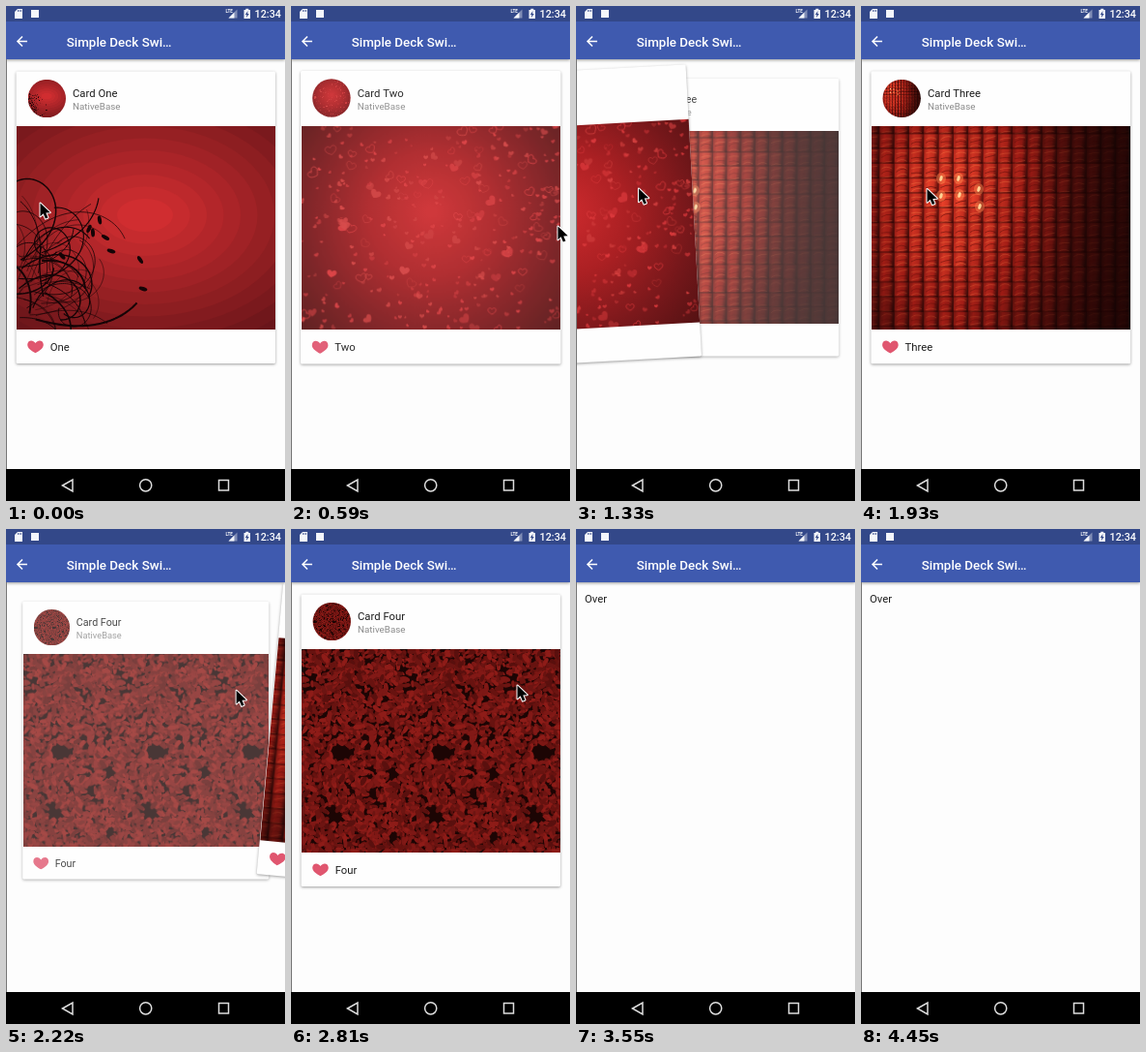
Write an HTML page with a canvas that moves like this. It is 289 by 511 pixels and loops after 4.6 s.

```html
<!DOCTYPE html>
<html lang="en">
<head>
<meta charset="utf-8">
<title>Deck swiper</title>
<style>
  html, body { margin: 0; width: 100%; height: 100%; overflow: hidden; background: #fdfdfd; }
  canvas { display: block; width: 289px; height: 511px; }
</style>
</head>
<body>
<canvas id="stage"></canvas>
<script>
const W = 289, H = 511, LOOP = 4600, TICK = 148;
const PAGE = '#fdfdfd';
const IMG = { x: 11, y: 124, w: 268, h: 210 };
const CENTER = { x: 144.75, y: 218.5 };
const TAU = Math.PI * 2;
const dpr = window.devicePixelRatio || 1;

const canvas = document.getElementById('stage');
canvas.width = W * dpr;
canvas.height = H * dpr;
const ctx = canvas.getContext('2d');

function seeded(seed) {
  return () => {
    seed = (seed * 1664525 + 1013904223) >>> 0;
    return seed / 4294967296;
  };
}

const mix = (a, b, k) => `rgb(${a.map((v, i) => Math.round(v + (b[i] - v) * k))})`;

function heart(c, x, y, size, angle, outline) {
  c.save();
  c.translate(x, y);
  c.rotate(angle);
  c.scale(size, size);
  c.beginPath();
  c.moveTo(0, 0.78);
  c.bezierCurveTo(-0.4, 0.58, -1, 0.2, -1, -0.25);
  c.bezierCurveTo(-1, -0.85, -0.3, -0.95, 0, -0.45);
  c.bezierCurveTo(0.3, -0.95, 1, -0.85, 1, -0.25);
  c.bezierCurveTo(1, 0.2, 0.4, 0.58, 0, 0.78);
  c.restore();
  outline ? c.stroke() : c.fill();
}

function ellipse(c, x, y, rx, ry, angle = 0) {
  c.beginPath();
  c.ellipse(x, y, rx, ry, angle, 0, TAU);
  c.fill();
}

// ---- card pictures ----

function paintSwirls(c, rnd) {
  const bands = 10;
  c.fillStyle = '#69151a';
  c.fillRect(0, 0, IMG.w, IMG.h);
  for (let i = bands; i >= 0; i--) {
    c.fillStyle = mix([208, 45, 48], [112, 23, 27], i / bands);
    ellipse(c, 133, 92, 29 + i * 17.5, 17 + i * 12.5);
  }
  c.strokeStyle = c.fillStyle = '#150406';
  for (let i = 0; i < 50; i++) {
    let x = rnd() * 40 - 8, y = 128 + rnd() * 80;
    let angle = -2 + rnd() * 2.6;
    const bend = (rnd() < 0.5 ? -1 : 1) * (0.006 + rnd() * 0.025);
    const steps = 25 + rnd() * 45;
    c.lineWidth = 0.4 + rnd() * rnd() * 1.8;
    c.beginPath();
    c.moveTo(x, y);
    for (let s = 0; s < steps; s++) {
      angle += bend * (1 + s / 14);
      x += Math.cos(angle) * 2;
      y += Math.sin(angle) * 2;
      c.lineTo(x, y);
    }
    c.stroke();
  }
  for (const [x, y, a] of [[86, 97, 1.4], [79, 110, 1.5], [92, 115, 0.5], [98, 129, 0.3],
    [128, 138, 1], [131, 168, 0.3], [47, 134, 0.8], [75, 106, 2]]) {
    ellipse(c, x, y, 4.5, 2, a);
  }
}

function paintHearts(c, rnd) {
  const glow = c.createRadialGradient(134, 88, 5, 134, 95, 175);
  glow.addColorStop(0, '#cb2a2d');
  glow.addColorStop(0.35, '#ab2023');
  glow.addColorStop(0.75, '#74171a');
  glow.addColorStop(1, '#551213');
  c.fillStyle = glow;
  c.fillRect(0, 0, IMG.w, IMG.h);
  c.lineWidth = 0.9;
  for (let i = 0; i < 340; i++) {
    const big = rnd() < 0.25;
    c.globalAlpha = 0.35 + rnd() * 0.6;
    c.fillStyle = c.strokeStyle = rnd() < 0.5 ? '#dd3a3d' : '#d4403f';
    heart(c, rnd() * IMG.w, rnd() * IMG.h, big ? 3.5 + rnd() * 2.5 : 1.2 + rnd() * 1.7,
      rnd() * 2 - 1, big && rnd() < 0.65);
  }
}

function paintGlass(c, rnd) {
  const size = 15.3;
  const black = [16, 3, 3], red = [158, 28, 21], orange = [240, 68, 44];
  const tone = k => k < 0.5 ? mix(black, red, k * 2) : mix(red, orange, k * 2 - 1);
  c.fillStyle = '#120303';
  c.fillRect(0, 0, IMG.w, IMG.h);
  for (let y = -7; y < IMG.h; y += size) {
    for (let x = -7; x < IMG.w; x += size) {
      const dx = (x - 76) / (x < 76 ? 100 : 100), dy = (y - 58) / (y < 58 ? 110 : 165);
      const light = 0.06 + Math.exp(-dx * dx - dy * dy) * (0.8 + rnd() * 0.14);
      const sheen = c.createLinearGradient(x, y, x + size, y + 2);
      sheen.addColorStop(0, tone(light * 0.65));
      sheen.addColorStop(0.35, tone(light));
      sheen.addColorStop(0.7, tone(light * 0.85));
      sheen.addColorStop(1, tone(light * 0.3));
      c.fillStyle = sheen;
      c.fillRect(x, y, size, size);
      c.lineWidth = 1;
      for (let k = 0; k < 3; k++) {
        const top = y + 2 + k * 4.5 + rnd() * 2;
        c.strokeStyle = k % 2 ? `rgba(50,0,0,${light * 0.5})` : `rgba(255,135,75,${light * 0.4})`;
        c.beginPath();
        c.moveTo(x + 2, top + 2);
        c.quadraticCurveTo(x + 7, top - 3 + rnd() * 4, x + 13, top - 1 + rnd() * 3);
        c.stroke();
      }
      c.fillStyle = 'rgba(25,0,0,.4)';
      c.fillRect(x, y + size - 1.6, size, 1.6);
    }
  }
  for (const [x, y] of [[72, 54], [90, 54], [111, 65], [72, 72], [112, 83], [91, 71]]) {
    c.fillStyle = 'rgba(255,130,75,.5)';
    ellipse(c, x, y, 5, 6);
    c.fillStyle = '#ffd596';
    ellipse(c, x, y, 1.6, 3, 0.3);
  }
}

function paintLeaves(c, rnd) {
  const period = 104;
  const holes = [[42, 107, 9], [86, 52, 5], [34, 173, 8], [72, 148, 5], [10, 30, 5], [94, 195, 5]];
  const shades = ['#5a100e', '#6d1512', '#7d1815', '#8e1c18', '#681310', '#821916'];
  c.fillStyle = '#1c0504';
  c.fillRect(0, 0, IMG.w, IMG.h);
  for (let i = 0; i < 1900; i++) {
    const x = rnd() * period, y = rnd() * IMG.h, angle = rnd() * TAU, length = 2 + rnd() * 3.5;
    c.fillStyle = shades[Math.floor(rnd() * shades.length)];
    if (holes.some(([hx, hy, r]) => Math.hypot((x - hx) * 0.8, y - hy) < r)) continue;
    for (let px = x - period; px < IMG.w + 10; px += period) {
      ellipse(c, px, y, length, length * 0.5, angle);
    }
  }
}

function picture(paint, seed) {
  const scale = Math.max(1, dpr);
  const image = document.createElement('canvas');
  image.width = Math.round(IMG.w * scale);
  image.height = Math.round(IMG.h * scale);
  const c = image.getContext('2d');
  c.scale(scale, scale);
  paint(c, seeded(seed));
  return image;
}

const cards = [
  { name: 'One', image: picture(paintSwirls, 11) },
  { name: 'Two', image: picture(paintHearts, 5) },
  { name: 'Three', image: picture(paintGlass, 8) },
  { name: 'Four', image: picture(paintLeaves, 21) }
];

// ---- motion ----

// Press, release and hand-over times of each card's swipe.
const swipes = [
  { down: 20, up: 240, done: 310 },
  { down: 1000, up: 1340, done: 1500 },
  { down: 1940, up: 2160, done: 2290 },
  { down: 2830, up: 3080, done: 3230 }
];

const pointerPath = [
  [0, 35.5, 203], [20, 35.5, 203], [240, 262, 224], [320, 276.5, 227], [640, 276.5, 227],
  [1000, 222, 200], [1332, 65, 188], [1924, 68.5, 188.5], [1940, 68.5, 188.5],
  [2160, 240, 168], [2400, 234.5, 161], [2830, 234.5, 161], [3080, 75, 163.5], [LOOP, 75, 163.5]
];

function pointerAt(t) {
  const i = pointerPath.findIndex(p => p[0] > t);
  const [t0, x0, y0] = pointerPath[i - 1], [t1, x1, y1] = pointerPath[i];
  const k = (t - t0) / (t1 - t0);
  return { x: x0 + (x1 - x0) * k, y: y0 + (y1 - y0) * k };
}

function swipeOffset({ down, up }, t) {
  if (t <= down) return 0;
  const dragged = pointerAt(Math.min(t, up)).x - pointerAt(down).x;
  const glide = t > up ? 130 * (1 - Math.exp((up - t) / 50)) : 0;
  return dragged + Math.sign(dragged) * glide;
}

// Underdamped spring from 0 to 1.
function spring(ms) {
  const s = ms / 1000, decay = 11, freq = 10.45;
  return 1 - Math.exp(-decay * s) * (Math.cos(freq * s) + decay / freq * Math.sin(freq * s));
}

// ---- drawing ----

function text(string, x, y, font, color) {
  ctx.font = `${font} Roboto, sans-serif`;
  ctx.fillStyle = color;
  ctx.fillText(string, x, y);
}

function polygon(points) {
  ctx.beginPath();
  points.forEach(([x, y]) => ctx.lineTo(x, y));
  ctx.closePath();
}

function drawCard({ name, image }, { dx = 0, scale = 1, opacity = 1 }) {
  ctx.save();
  ctx.translate(CENTER.x + dx, CENTER.y);
  ctx.rotate(dx * 0.02 * Math.PI / 180);
  ctx.scale(scale, scale);
  ctx.translate(-CENTER.x, -CENTER.y);

  const outline = new Path2D();
  outline.roundRect(10.5, 67.5, 268.5, 301.5, 1.5);
  ctx.save();
  ctx.shadowColor = `rgba(0,0,0,${0.38 * opacity})`;
  ctx.shadowBlur = 3 * dpr;
  ctx.shadowOffsetY = dpr;
  ctx.fillStyle = '#fefefe';
  ctx.fill(outline);
  ctx.restore();

  ctx.drawImage(image, IMG.x, IMG.y, IMG.w, IMG.h);
  ctx.save();
  ctx.beginPath();
  ctx.arc(42.3, 95.5, 19.7, 0, TAU);
  ctx.clip();
  const side = image.height;
  ctx.drawImage(image, (image.width - side) / 2, 0, side, side, 22.5, 75.7, 39.6, 39.6);
  ctx.restore();

  text('Card ' + name, 69, 94, '11.3px', '#1c1c1c');
  text('NativeBase', 69, 107, '9.8px', '#8b8b8b');
  text(name, 45.7, 355.5, '11.3px', '#1c1c1c');
  ctx.fillStyle = '#e0566f';
  heart(ctx, 30.5, 351.8, 8.3, 0);

  // A veil in the page colour fades the card as one layer.
  ctx.globalAlpha = 1 - opacity;
  ctx.fillStyle = PAGE;
  ctx.fill(outline);
  ctx.restore();
}

function drawDeck(t) {
  const i = swipes.findIndex(s => t < s.done);
  if (i < 0) {
    text('Over', 9, 75.8, '11.3px', '#1c1c1c');
    return;
  }
  const dx = swipeOffset(swipes[i], t);
  if (dx && cards[i + 1]) {
    drawCard(cards[i + 1], { scale: 0.9 + 0.05 * Math.min(1, Math.abs(dx) / 157), opacity: 0.8 });
  }
  const shown = i ? t - swipes[i - 1].done : LOOP;
  drawCard(cards[i], {
    dx,
    scale: 0.9 + 0.1 * spring(shown),
    opacity: 0.8 + 0.2 * Math.min(1, shown / 420)
  });
}

function drawBars() {
  ctx.save();
  ctx.shadowColor = 'rgba(0,0,0,.4)';
  ctx.shadowBlur = 3 * dpr;
  ctx.shadowOffsetY = dpr;
  ctx.fillStyle = '#3f5aaf';
  ctx.fillRect(0, 16, W, 39);
  ctx.restore();
  ctx.fillStyle = '#334889';
  ctx.fillRect(0, 0, W, 16);
  ctx.fillStyle = '#777';
  ctx.fillRect(0, 55, 1, H);
  ctx.fillStyle = '#000';
  ctx.fillRect(0, 478, W, H);

  // Status icons: storage card, plain badge, signal, battery.
  ctx.fillStyle = '#f4f6fb';
  polygon([[12, 3], [17, 3], [17, 13], [9, 13], [9, 6]]);
  ctx.fill();
  ctx.fillRect(26, 4, 8, 8);
  polygon([[239.5, 3.5], [239.5, 12.5], [230.5, 12.5]]);
  ctx.globalAlpha = 0.4;
  ctx.fill();
  ctx.globalAlpha = 1;
  polygon([[236.5, 6.5], [236.5, 12.5], [230.5, 12.5]]);
  ctx.fill();
  ctx.fillRect(246.5, 4, 6.5, 9);
  ctx.fillRect(248.3, 2.8, 3, 1.5);
  ctx.fillStyle = '#334889';
  polygon([[250.5, 5], [247.8, 9], [249.4, 9], [249, 12], [251.8, 8], [250.2, 8]]);
  ctx.fill();
  for (let x = 12; x < 17; x += 1.7) ctx.fillRect(x, 4, 0.7, 2);
  text('LTE', 227.5, 7, 'bold 4.6px', '#fff');
  text('12:34', 257.5, 12.2, '500 10.8px', '#fff');
  text('Simple Deck Swi…', 62.7, 41.5, '500 13.4px', '#fff');

  ctx.strokeStyle = '#fff';
  ctx.lineWidth = 1.6;
  ctx.beginPath();
  ctx.moveTo(22, 36.5);
  ctx.lineTo(12.2, 36.5);
  ctx.moveTo(17, 31.5);
  ctx.lineTo(12, 36.5);
  ctx.lineTo(17, 41.5);
  ctx.stroke();

  ctx.strokeStyle = '#dedede';
  ctx.lineWidth = 1.5;
  polygon([[58.5, 495], [69, 489], [69, 501]]);
  ctx.stroke();
  ctx.beginPath();
  ctx.arc(144.7, 494.8, 6.1, 0, TAU);
  ctx.stroke();
  ctx.strokeRect(220.5, 489.5, 10, 10.5);
}

function drawPointer({ x, y }) {
  ctx.save();
  ctx.translate(x, y);
  polygon([[0, 0.5], [0, 14.2], [3.2, 11.3], [5.4, 16.6], [8, 15.5], [5.8, 10.4], [10.3, 10.3]]);
  ctx.lineJoin = 'round';
  ctx.strokeStyle = '#fff';
  ctx.lineWidth = 2;
  ctx.stroke();
  ctx.fillStyle = '#000';
  ctx.fill();
  ctx.restore();
}

function render(now) {
  const t = Math.floor((now % LOOP + 10) / 148.2) * TICK;
  ctx.setTransform(dpr, 0, 0, dpr, 0, 0);
  ctx.fillStyle = PAGE;
  ctx.fillRect(0, 0, W, H);
  drawDeck(t);
  drawBars();
  if (t < 3550) drawPointer(pointerAt(t));
}

let start;
function loop(now) {
  start ??= now;
  render(now - start);
  requestAnimationFrame(loop);
}
requestAnimationFrame(loop);
</script>
</body>
</html>
```
